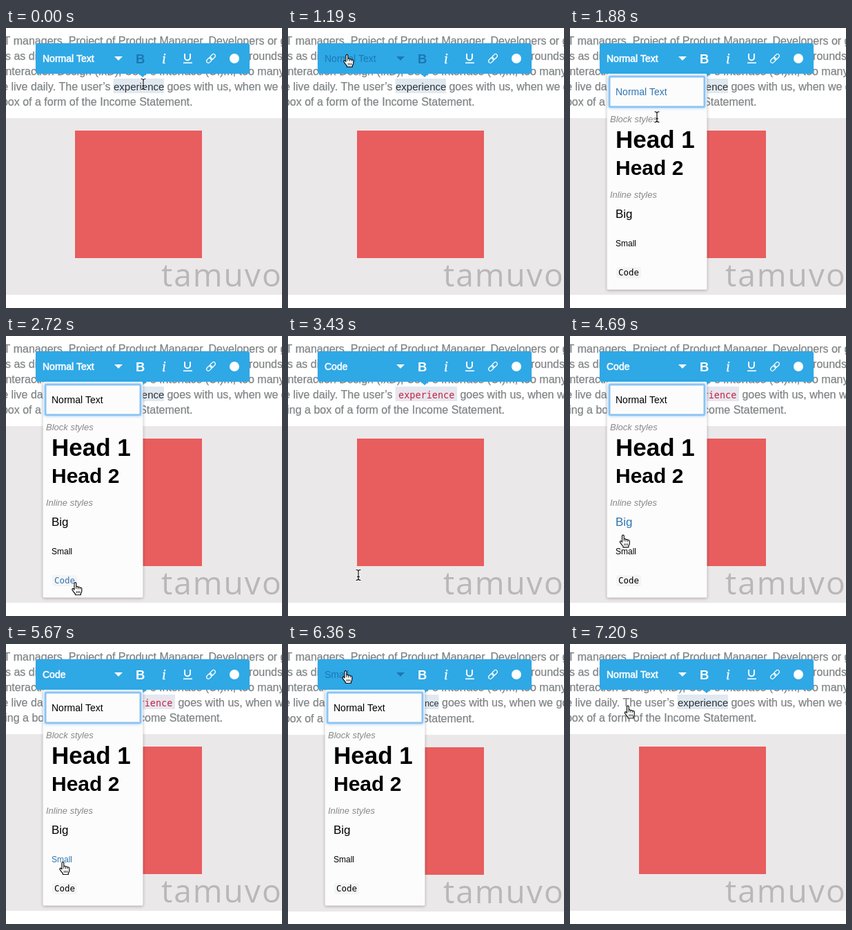
Recreate the animation shown at these times as an HTML page with a canvas. Size 400 by 404 pixels, loop 9.23 s.

```html
<!DOCTYPE html>
<html lang="en">
<head>
<meta charset="utf-8">
<title>Text style toolbar</title>
<style>
html, body { margin: 0; width: 100%; height: 100%; overflow: hidden; background: #fff; }
canvas { display: block; width: 400px; height: 404px; }
</style>
</head>
<body>
<canvas id="stage"></canvas>
<script>
const LOOP = 9230;
const SANS = '"Liberation Sans", Arial, sans-serif';
const MONO = '"DejaVu Sans Mono", monospace';
const BLUE = '#2fa8e6', DIM = '#1b78b2', HOVER = '#2f76b0', GRAY = '#808486';

const canvas = document.getElementById('stage');
const ctx = canvas.getContext('2d');
const dpr = window.devicePixelRatio || 1;
canvas.width = 400 * dpr;
canvas.height = 404 * dpr;

// Pointer path: time, x, y
const path = [
  [0, 199, 81], [500, 199, 81], [1250, 86, 46], [1500, 86, 46],
  [1880, 126, 128], [2650, 103, 364], [3340, 103, 364], [3950, 86.5, 45.5],
  [4240, 86.5, 45.5], [4690, 79.5, 295], [5000, 85, 323], [5700, 85, 323],
  [6250, 86, 47], [6570, 86, 47], [6950, 86.5, 97.5], [LOOP, 86.5, 97.5]
];

// Menu entries: label, font, x, baseline, hover top, hover bottom
const items = [
  ['Normal Text', '14px ' + SANS, 66, 97, 68, 132],
  ['Head 1', 'bold 35px ' + SANS, 66, 173, 142, 178],
  ['Head 2', 'bold 30px ' + SANS, 66, 212, 178, 222],
  ['Big', '17px ' + SANS, 66, 274, 250, 291],
  ['Small', '12px ' + SANS, 66, 315, 291, 332],
  ['Code', '12.5px ' + MONO, 70, 357, 335, 376]
];

const within = (v, a, b) => v >= a && v < b;

function slope(i, k) {
  if (i === 0 || i === path.length - 1) return 0;
  const [a, b, c] = [path[i - 1], path[i], path[i + 1]];
  const rest = (p, q) => p[1] === q[1] && p[2] === q[2];
  return rest(a, b) || rest(b, c) ? 0 : (c[k] - a[k]) / (c[0] - a[0]);
}

function pointerAt(t) {
  let i = 0;
  while (i < path.length - 2 && t >= path[i + 1][0]) i++;
  const a = path[i], b = path[i + 1], d = b[0] - a[0];
  const u = (t - a[0]) / d, u2 = u * u, u3 = u2 * u;
  return [1, 2].map(k =>
    (2 * u3 - 3 * u2 + 1) * a[k] + (3 * u2 - 2 * u3) * b[k] +
    (u3 - 2 * u2 + u) * d * slope(i, k) + (u3 - u2) * d * slope(i + 1, k));
}

// weight adds a thin outline for slightly heavier letters
function text(s, x, y, font, color, align = 'left', weight = 0) {
  ctx.font = font;
  ctx.fillStyle = ctx.strokeStyle = color;
  ctx.textAlign = align;
  ctx.fillText(s, x, y);
  if (!weight) return;
  ctx.lineWidth = weight;
  ctx.strokeText(s, x, y);
}

function box(x, y, w, h, color, r = 0) {
  ctx.fillStyle = color;
  ctx.beginPath();
  ctx.roundRect(x, y, w, h, r);
  ctx.fill();
}

function poly(points, color) {
  ctx.fillStyle = color;
  ctx.beginPath();
  points.forEach(([x, y]) => ctx.lineTo(x, y));
  ctx.closePath();
  ctx.fill();
}

function drawPage(style) {
  const small = style === 'Small', code = style === 'Code';
  const drop = small ? 1 : 0;
  const line = (s, x, y, align) => text(s, x, y, '16px ' + SANS, GRAY, align, 0.25);

  line('T managers, Project of Product Manager, Developers or g', -3.5, 24);
  line('s as different', -1, 46);
  line('backgrounds', 401, 46, 'right');
  line('Interaction Design (IxD), User’s Interface (UI)m, too many', -5, 68);
  line('e live daily. The user’s ', 156, 90, 'right');

  const end = code ? 245 : small ? 218.6 : 229;
  box(155.5, 73, end - 155.5, 21, '#e0e9f0');
  if (code) {
    box(156, 75, 88, 19, '#e8e5ee', 3);
    text('experience', 160, 90, '13.5px ' + MONO, '#c0243f');
  } else {
    text('experience', 156, 90, (small ? 12.8 : 15) + 'px ' + SANS, '#2b2f33');
  }
  line('goes with us, when we go', end + 4.4, 90);
  if (code) line('ing a box of a form of the Income Statement.', 314, 112, 'right');
  else line('box of a form of the Income Statement.', 270.5, 112 + drop, 'right');

  box(0, 130 + drop, 400, 255, '#ebe8e9');
  box(100, 148 + drop, 184, 184, '#e85d5e');
  ctx.letterSpacing = '2px';
  text('tamuvo', 225, 373 + drop, '46px "Open Sans", sans-serif', '#b9b7b8');
  ctx.letterSpacing = '0px';
}

function drawLink() {
  ctx.save();
  ctx.translate(297, 44);
  ctx.rotate(-Math.PI / 4);
  ctx.strokeStyle = '#fff';
  ctx.lineWidth = 1.3;
  for (const x of [-8, -1]) {
    ctx.beginPath();
    ctx.roundRect(x, -2.6, 9, 5.2, 2.6);
    ctx.stroke();
  }
  ctx.restore();
}

function drawToolbar(label, dimLabel, dimBold) {
  ctx.save();
  ctx.shadowColor = 'rgba(0,0,0,.12)';
  ctx.shadowBlur = 3;
  box(43, 22, 310, 44, BLUE, 3);
  ctx.restore();
  poly([[192, 65.5], [204, 65.5], [198, 71]], BLUE);

  const color = dimLabel ? DIM : '#fff';
  text(label, 53, 49, '14px ' + SANS, color, 'left', dimLabel ? 0 : 0.55);
  poly([[157, 41], [169, 41], [163, 47]], color);

  text('B', 188, 50.5, 'bold 18.5px ' + SANS, dimBold ? DIM : '#fff');
  text('i', 226, 51, 'italic 21px "Liberation Serif", serif', '#fff', 'left', 0.3);
  ctx.strokeStyle = '#fff';
  ctx.lineWidth = 2;
  ctx.beginPath();
  ctx.moveTo(259, 37);
  ctx.lineTo(259, 42.5);
  ctx.arc(263, 42.5, 4, Math.PI, 0, true);
  ctx.lineTo(267, 37);
  ctx.stroke();
  box(257, 49.5, 13, 1.6, '#fff');
  drawLink();
  ctx.fillStyle = '#fff';
  ctx.beginPath();
  ctx.arc(331, 44, 7, 0, 7);
  ctx.fill();
}

function drawMenu(x, y) {
  ctx.save();
  ctx.shadowColor = 'rgba(0,0,0,.3)';
  ctx.shadowBlur = 4;
  ctx.shadowOffsetY = 1;
  box(53.5, 66, 145, 311.5, '#fcfcfc', 2);
  ctx.restore();
  box(53, 64, 146, 2, BLUE);

  ctx.save();
  ctx.shadowColor = '#7fbcf2';
  ctx.shadowBlur = 4;
  box(56, 69, 140, 46, '#8ac3f4', 2);
  ctx.restore();
  box(58.5, 71.5, 135, 41, '#fcfcfc');

  const label = 'italic 13px ' + SANS;
  text('Block styles', 58, 136, label, '#888');
  text('Inline styles', 58, 245, label, '#888');
  box(67, 345, 36, 16, '#f4f4f5', 3);
  for (const [name, font, left, base, top, bottom] of items) {
    const over = within(x, 53, 199) && within(y, top, bottom);
    text(name, left, base, font, over ? HOVER : '#000');
  }
}

function drawBeam(x, y) {
  ctx.lineCap = 'round';
  for (const [color, width] of [['rgba(255,255,255,.8)', 3], ['#111', 1.2]]) {
    ctx.strokeStyle = color;
    ctx.lineWidth = width;
    ctx.beginPath();
    for (const s of [-1, 1]) {
      ctx.moveTo(x - 3, y + s * 7.5);
      ctx.quadraticCurveTo(x, y + s * 7.5, x, y + s * 5.5);
      ctx.quadraticCurveTo(x, y + s * 7.5, x + 3, y + s * 7.5);
    }
    ctx.moveTo(x, y - 6);
    ctx.lineTo(x, y + 6);
    ctx.moveTo(x - 1.5, y + 2.5);
    ctx.lineTo(x + 1.5, y + 2.5);
    ctx.stroke();
  }
  ctx.lineCap = 'butt';
}

function drawHand(x, y) {
  ctx.save();
  ctx.translate(x, y);
  const hand = new Path2D('M-4 2V-6.5Q-4-8.3-2.6-8.3T-1.2-6.5V-2.2Q.2-3.5 1.5-1.6' +
    'Q3-2.7 4.2-.9Q6.8-1.5 6.8 1V4Q6.8 6 5.4 7.4V9.5H-2.6V8Q-4.5 6-7 2.3Q-7.4.7-6 .4Q-4.8.5-4 2Z');
  ctx.fillStyle = '#fff';
  ctx.strokeStyle = '#111';
  ctx.lineWidth = 1.2;
  ctx.lineJoin = 'round';
  ctx.fill(hand);
  ctx.stroke(hand);
  ctx.lineWidth = 0.9;
  ctx.stroke(new Path2D('M-1.2-2.2V1M1.5-1.6V1.4M4.2-.9V1.6M-.6 4V7M1.6 4V7M3.8 4V7'));
  ctx.restore();
}

function draw(t) {
  const [x, y] = pointerAt(t);
  const tip = y - 8;
  const style = within(t, 3370, 5700) ? 'Code' : within(t, 5700, 7000) ? 'Small' : 'Normal Text';
  const open = within(t, 1440, 3370) || within(t, 4240, 5700) || within(t, 6300, 7000);
  const onBar = within(x, 43, 353) && within(tip, 22, 66);
  const onLabel = within(y, 118, 141) || within(y, 229, 250);

  ctx.setTransform(dpr, 0, 0, dpr, 0, 0);
  box(0, 0, 400, 404, '#fff');
  drawPage(style);
  drawToolbar(style, onBar && x < 180, t < 1440);
  if (open) drawMenu(x, tip);
  const hand = t > 6500 || (onBar && t > 500) || (open && !onLabel);
  (hand ? drawHand : drawBeam)(x, y);
}

const start = performance.now();
function tick() {
  draw((performance.now() - start) % LOOP);
  requestAnimationFrame(tick);
}
tick();
</script>
</body>
</html>
```
